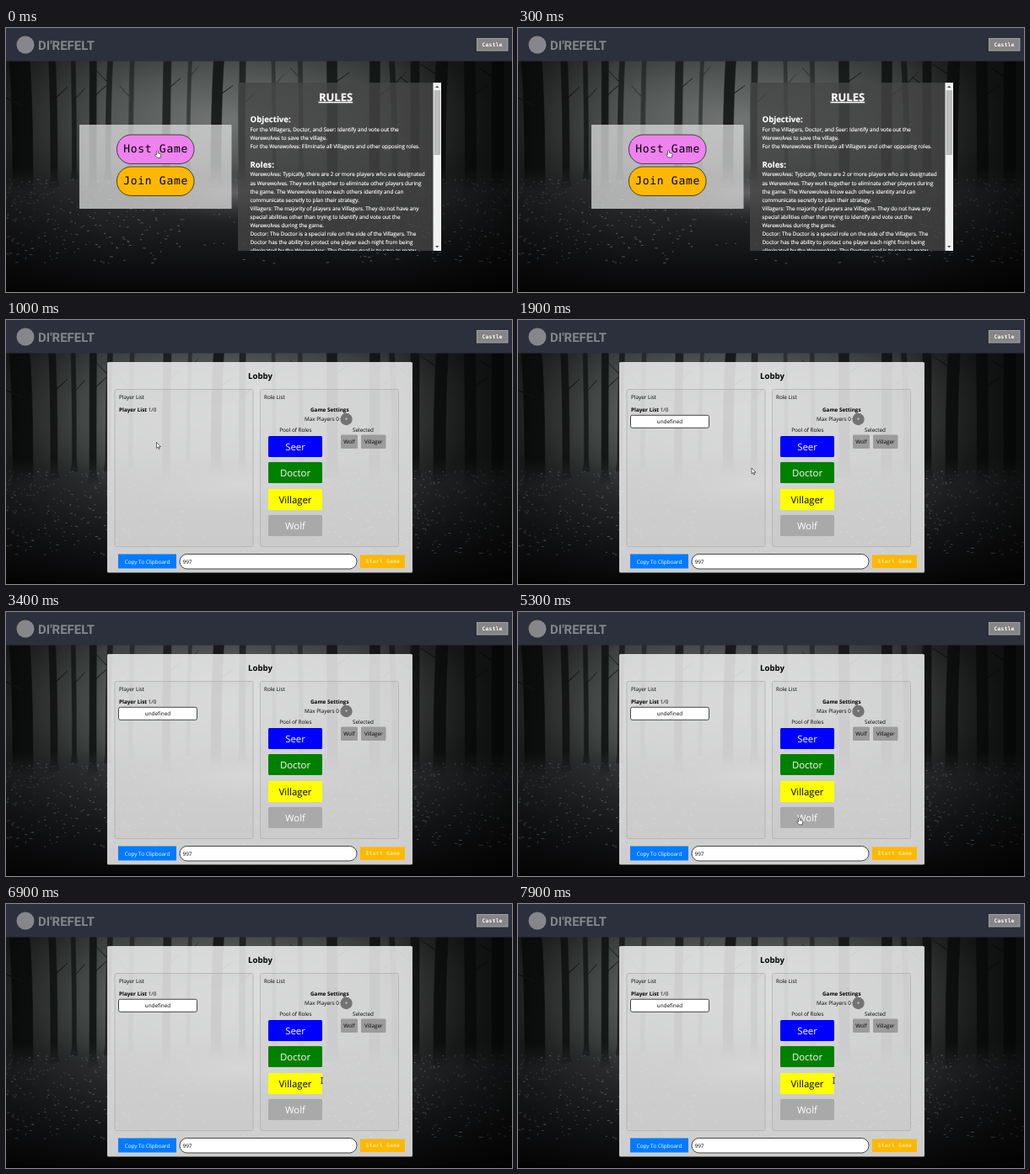
Animation of 600 by 314 pixels, one loop 8000 ms. Source, as an HTML page:

```html
<!DOCTYPE html>
<html lang="en">
<head>
<meta charset="utf-8">
<title>Lobby</title>
<style>
  html, body { margin: 0; width: 100%; height: 100%; overflow: hidden; background: #080808; }
  svg { display: block; width: 100vw; height: 100vh; }
  text { font: 6.35px "Open Sans", "Noto Sans", sans-serif; text-rendering: geometricPrecision; }
  .b { font-weight: 700; }
  .c { text-anchor: middle; }
  .w { fill: #fff; }
  #rules text { stroke: #fff; stroke-width: .15; }
  .h { font-size: 9.6px; font-weight: 700; }
  .role { font-size: 11.4px; text-anchor: middle; }
  .mono { font: 700 6.2px "DejaVu Sans Mono", monospace; letter-spacing: .35px; text-anchor: middle; }
  .big { font: 13px "DejaVu Sans Mono", monospace; letter-spacing: .7px; text-anchor: middle; }
  .logo { font: 700 15px Roboto, sans-serif; }
</style>
</head>
<body>
<svg viewBox="0 0 600 314" preserveAspectRatio="none">
  <defs>
    <radialGradient id="fog" gradientUnits="userSpaceOnUse" cx="0" cy="0" r="1"
      gradientTransform="translate(260 110) scale(320 125)">
      <stop offset="0" stop-color="#717675"/>
      <stop offset=".45" stop-color="#515654"/>
      <stop offset="1" stop-color="#202322"/>
    </radialGradient>
    <linearGradient id="ground" x2="0" y2="1">
      <stop offset="0" stop-color="#2e3032" stop-opacity="0"/>
      <stop offset=".2" stop-color="#2b2d2f" stop-opacity=".9"/>
      <stop offset=".6" stop-color="#17181a"/>
      <stop offset="1" stop-color="#060607"/>
    </linearGradient>
    <radialGradient id="path">
      <stop offset="0" stop-color="#77767a" stop-opacity=".75"/>
      <stop offset="1" stop-color="#3a383a" stop-opacity="0"/>
    </radialGradient>
    <linearGradient id="edges">
      <stop offset="0" stop-color="#000" stop-opacity=".4"/>
      <stop offset=".2" stop-color="#000" stop-opacity="0"/>
      <stop offset=".75" stop-color="#000" stop-opacity="0"/>
      <stop offset="1" stop-color="#000" stop-opacity=".65"/>
    </linearGradient>
    <clipPath id="rulesClip"><rect x="275" y="65" width="232" height="200"/></clipPath>
  </defs>

  <rect y="39" width="600" height="275" fill="url(#fog)"/>
  <g id="trunks" fill="#0f1110" stroke="#0f1110" stroke-width=".6"></g>
  <rect y="165" width="600" height="149" fill="url(#ground)"/>
  <ellipse cx="280" cy="195" rx="140" ry="38" fill="url(#path)"/>
  <path id="leaves" stroke="#9a9b9e" stroke-opacity=".55" stroke-width=".9"/>
  <rect y="39" width="600" height="275" fill="url(#edges)"/>
  <rect y="312" width="600" height="2" fill="#000"/>

  <rect width="600" height="39.5" fill="#2b303c"/>
  <circle cx="23" cy="20" r="10.5" fill="#85878b"/>
  <text class="logo" x="38" y="26" fill="#85878b">DI'REFELT</text>
  <rect x="558.5" y="12.5" width="36.5" height="14.5" fill="#858585" stroke="#b4b4b4" stroke-width=".8"/>
  <text class="mono w" x="576.7" y="21.6">Castle</text>

  <g id="home">
    <rect x="87" y="115" width="180.5" height="100" fill="#dcdcdc" fill-opacity=".75"/>
    <g stroke="#222" stroke-width=".8">
      <rect x="131.5" y="127" width="91.5" height="34.5" rx="17" fill="#ee82ee"/>
      <rect x="131.5" y="165" width="91.5" height="34.5" rx="17" fill="#ffb800"/>
    </g>
    <text class="big" x="177.6" y="148.3">Host Game</text>
    <text class="big" x="177.6" y="186.3">Join Game</text>
    <rect x="275" y="65" width="241" height="200" fill="#464646" fill-opacity=".78"/>
    <g id="rules" class="w" clip-path="url(#rulesClip)">
      <text class="b c" x="391" y="86.8" style="font-size:13px" text-decoration="underline">RULES</text>
      <text class="h" x="289.5" y="111.7">Objective:</text>
      <text class="h" x="289.5" y="165.6">Roles:</text>
    </g>
    <rect x="506.5" y="65" width="9.5" height="200" fill="#f1f1f1"/>
    <rect x="507.5" y="74" width="7.5" height="77" fill="#bcbcbc"/>
    <path d="M509 71l2.2-2.6 2.2 2.6zM509 259l2.2 2.6 2.2-2.6z" fill="#555"/>
  </g>

  <g id="lobby">
    <rect x="120" y="50" width="362" height="250.5" rx="1.5" fill="#f0f0f0" fill-opacity=".85"/>
    <text class="h c" x="301.5" y="70.2">Lobby</text>
    <g fill="#000" fill-opacity=".02" stroke="#b0b0b0" stroke-width=".8">
      <rect x="129" y="82.5" width="164" height="187" rx="2"/>
      <rect x="301.5" y="82.5" width="164" height="187" rx="2"/>
    </g>
    <text x="134" y="94.3">Player List</text>
    <text x="134" y="108.6"><tspan class="b">Player List</tspan> 1/0</text>
    <g id="player">
      <rect x="133.5" y="113.3" width="93" height="15" rx="2" fill="#fff" stroke="#333" stroke-width=".9"/>
      <text class="c" x="180" y="123.2">undefined</text>
    </g>
    <text x="306" y="94.3">Role List</text>
    <text class="b c" x="383.8" y="108.6">Game Settings</text>
    <text x="354" y="120.4">Max Players 0</text>
    <circle cx="403.5" cy="118" r="7.2" fill="#737373"/>
    <text class="c w" x="403.5" y="120.2">+</text>
    <text class="c" x="343.3" y="132.5">Pool of Roles</text>
    <text class="c" x="423.5" y="132.5">Selected</text>
    <g id="roles"></g>
    <g fill="#9b9b9b">
      <rect x="397" y="136.5" width="20" height="16.5" rx="1.5"/>
      <rect x="421" y="136.5" width="29.5" height="16.5" rx="1.5"/>
    </g>
    <text class="c" x="407" y="147.3">Wolf</text>
    <text class="c" x="435.8" y="147.3">Villager</text>
    <rect x="133" y="278.5" width="69" height="17" fill="#007bff"/>
    <text class="c w" x="167.5" y="289.5">Copy To Clipboard</text>
    <rect x="206" y="278.5" width="210" height="17.5" rx="8.7" fill="#fff" stroke="#333" stroke-width=".9"/>
    <text x="209.5" y="289.7">997</text>
    <rect x="420" y="279.5" width="53" height="15.5" fill="#ffb800"/>
    <text class="mono" x="447" y="289.2" fill="#ffe7a0">Start Game</text>
  </g>

  <g id="cursor" stroke-linejoin="round">
    <path id="arrow" d="M0 0V7l1.6-1.4 1.1 2.4 1.1-.5-1.1-2.3H5z" fill="#fff" stroke="#111" stroke-width=".6"/>
    <path id="hand" d="M-1 .5Q0-.7 .8.5V3L3.6 3.7Q4.5 4 4.3 5L3.6 8.4H-.3L-3 5Q-2.6 3.8-1 5z"
      fill="#fff" stroke="#111" stroke-width=".6"/>
    <path id="beam" d="M-1.4-3.3H1.4M0-3.3V3.3M-1.4 3.3H1.4" fill="none" stroke="#111" stroke-width=".7"/>
  </g>
</svg>
<script>
const $ = id => document.getElementById(id);
const show = (id, on) => $(id).setAttribute("visibility", on ? "inherit" : "hidden");

let seed = 7;
const rand = () => (seed = seed * 16807 % 2147483647) / 2147483647;

// Forest: x, width, foot and opacity of each trunk, then scattered leaves
$("trunks").innerHTML = [
  [20, 24, 205, .95], [57, 8, 190, .8], [81, 5, 180, .7], [103, 8, 195, .85], [121, 6, 180, .7],
  [148, 5, 175, .5], [190, 9, 190, .75], [216, 4, 170, .5], [249, 12, 190, .85], [280, 7, 180, .7],
  [318, 4, 168, .45], [350, 5, 172, .5], [387, 12, 188, .8], [437, 12, 195, .85], [461, 6, 180, .7],
  [485, 10, 190, .85], [514, 14, 200, .9], [551, 13, 198, .9], [583, 14, 205, .95]
].map(([x, w, foot, o]) => {
  const lean = (rand() - .5) * 8, y = 55 + rand() * 40, reach = (rand() < .5 ? -1 : 1) * (8 + w);
  return `<path opacity="${o}" d="M${x - w / 2 + lean} 39h${w}Q${x + w / 2} 90 ${x + w * .5} ${foot - 12}
    l${w * .3} 12h${-w * 1.6}l${w * .3}-12Q${x - w / 2} 90 ${x - w / 2 + lean} 39z
    M${x} ${y}l${reach}-14l${-reach} 15z"/>`;
}).join("");

let leaves = "";
for (let i = 0; i < 900; i++) {
  const depth = rand() ** 1.5, x = rand() * 600, y = 180 + depth * 100;
  const onPath = Math.abs(x - 290) < 40 + depth * 70;
  if (onPath && rand() < .8) continue;
  const len = .6 + rand() * (1 + depth * 2.5);
  leaves += `M${x.toFixed(1)} ${y.toFixed(1)}l${len.toFixed(1)} ${(rand() - .5).toFixed(1)}`;
}
$("leaves").setAttribute("d", leaves);

const addLines = (y, lines) => lines.forEach((line, i) =>
  $("rules").insertAdjacentHTML("beforeend", `<text x="289.5" y="${y + i * 10.1}">${line}</text>`));
addLines(122.8, [
  "For the Villagers, Doctor, and Seer: Identify and vote out the",
  "Werewolves to save the village.",
  "For the Werewolves: Eliminate all Villagers and other opposing roles."
]);
addLines(176.4, [
  "Werewolves: Typically, there are 2 or more players who are designated",
  "as Werewolves. They work together to eliminate other players during",
  "the game. The Werewolves know each others identity and can",
  "communicate secretly to plan their strategy.",
  "Villagers: The majority of players are Villagers. They do not have any",
  "special abilities other than trying to identify and vote out the",
  "Werewolves during the game.",
  "Doctor: The Doctor is a special role on the side of the Villagers. The",
  "Doctor has the ability to protect one player each night from being",
  "eliminated by the Werewolves. The Doctors goal is to save as many"
]);

const roleTop = i => Math.round(138 + i * 31.3);
$("roles").innerHTML = [
  ["Seer", "#00f", "#fff"], ["Doctor", "#008000", "#fff"],
  ["Villager", "#ff0", "#000"], ["Wolf", "#a9a9a9", "#fff"]
].map(([name, fill, ink], i) =>
  `<rect x="311" y="${roleTop(i)}" width="64" height="25" rx="1.5" fill="${fill}"/>
   <text class="role" x="343" y="${roleTop(i) + 17}" fill="${ink}">${name}</text>`
).join("");

// Pointer path: time, x, y
const path = [
  [0, 179.5, 146], [400, 178.5, 145.5], [1300, 178.5, 145.5], [1900, 277, 176], [2100, 277, 176],
  [2600, 330, 318], [5000, 345, 318], [5300, 333.5, 244.5], [6300, 333.5, 244.5],
  [6900, 374.5, 210], [8000, 374.5, 210]
];

function pointAt(t) {
  const i = path.findIndex(p => p[0] > t);
  const [t0, x0, y0] = path[i - 1], [t1, x1, y1] = path[i];
  const u = (t - t0) / (t1 - t0), k = u * u * (3 - 2 * u);
  return [x0 + (x1 - x0) * k, y0 + (y1 - y0) * k];
}

function draw(now) {
  const t = Math.floor(now % 8000 / 100) * 100;
  const atHome = t < 400, [x, y] = pointAt(t);
  const onRole = x > 311 && x < 374 && [0, 1, 2, 3].some(i => y > roleTop(i) && y < roleTop(i) + 25);
  const shape = t >= 6900 ? "beam" : atHome || onRole ? "hand" : "arrow";
  show("home", atHome);
  show("lobby", !atHome);
  show("player", t >= 1900);
  for (const id of ["arrow", "hand", "beam"]) show(id, id === shape);
  $("cursor").setAttribute("transform", `translate(${x} ${y})`);
}

let start;
function tick(now) {
  start ??= now;
  draw(now - start);
  requestAnimationFrame(tick);
}
draw(0);
requestAnimationFrame(tick);
</script>
</body>
</html>
```
